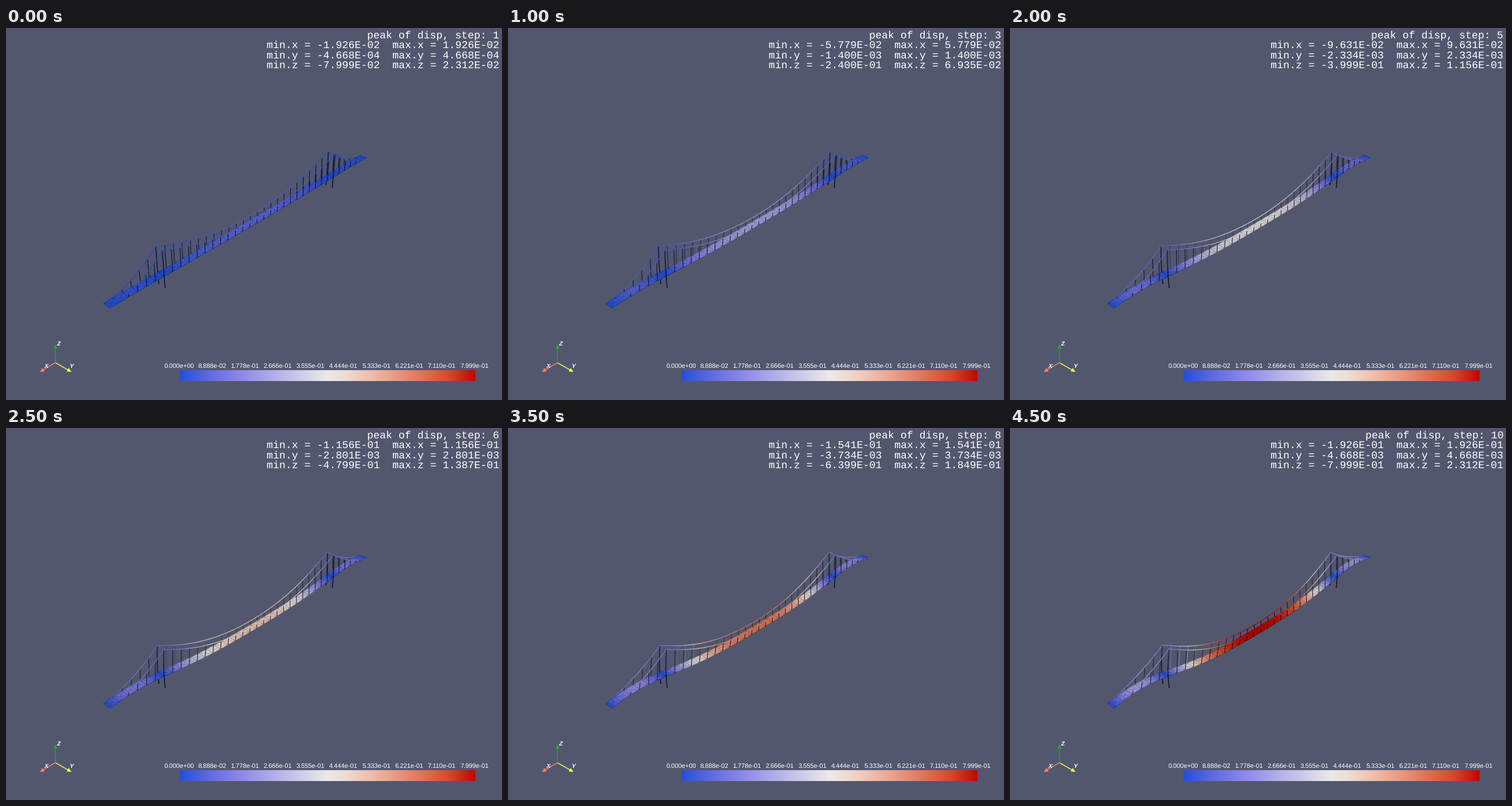
A matplotlib script for the animation above (5 s loop, 864 px wide and 648 px high).

```python
import numpy as np
import matplotlib.pyplot as plt
from matplotlib.animation import FuncAnimation
from matplotlib.collections import LineCollection, PolyCollection
from matplotlib.colors import LinearSegmentedColormap

plt.rcParams["text.hinting"] = "none"

W, H, DPI = 864, 648, 100
PX = 72 / DPI
STEPS = 10
PANELS, SIDE = 36, 6
SAG, SWAY = 0.435, 0.0095     # deck drop and tower lean at the last step
LOW = 0.17                    # cable height at mid-span, in tower heights
PEAK = dict(x=(0.019262, 0.019262), y=(0.0004668, 0.0004668),
            z=(0.079989, 0.023116))

cmap = LinearSegmentedColormap.from_list("disp", [
    (0.0, "#2350da"), (0.1, "#5f6be0"), (0.22, "#938cea"), (0.33, "#b6b2e8"),
    (0.45, "#dcdae8"), (0.5, "#ebe8e8"), (0.56, "#efdcd4"), (0.66, "#edb8a5"),
    (0.75, "#e6927c"), (0.85, "#dc6748"), (0.92, "#d2442b"), (1.0, "#c30404")])

fig = plt.figure(figsize=(W / DPI, H / DPI), dpi=DPI, facecolor="#52576e")
ax = fig.add_axes([0, 0, 1, 1])
ax.axis("off")


def project(u, v, z):
    """Bridge axes (along, across, up) to stage pixels."""
    w = 1 + 0.34 * u + 0.0083 * v - 0.0284 * z
    x = (181 + 660.5 * u - 9.6 * v - 11.7 * z) / w
    y = (488 - 185.2 * u - 4.0 * v - 58.4 * z) / w
    return np.stack([x, y], axis=-1)


def cable_height(i):
    main = LOW + (1 - LOW) * ((i - 18) / 12) ** 2
    end = np.minimum(i, PANELS - i) / SIDE
    return np.where(np.abs(i - 18) <= 12, main, end ** 2)


def lift(i):
    """Vertical mode shape along the deck, at full size."""
    a = np.pi * (i - SIDE) / 24
    main = -SAG * (np.sin(a) + 0.08 * np.sin(3 * a)) / 0.92
    end = np.minimum(i, PANELS - i) / SIDE
    return np.where(np.abs(i - 18) <= 12, main, 0.289 * SAG * np.sin(np.pi * end))


def lean(i):
    """Lengthwise mode shape along the cable, at full size."""
    return SWAY * np.interp(i, [0, 6, 18, 30, 36], [0, 1, 0, -1, 0])


def shade(mag, k, alpha=1.0):
    rgba = cmap(np.clip(mag, 0, 1))
    rgba[..., :3] *= np.asarray(k)[..., None] if np.ndim(k) else k
    rgba[..., 3] = alpha
    return rgba


def size(dz, du):
    return np.hypot(dz / SAG, 0.2408 * du / SWAY)


def pairs(a, b):
    return np.stack([a, b], axis=1)


def chain(pts):
    return pairs(pts[:-1], pts[1:])


def lines(width, z):
    c = LineCollection([], linewidths=width * PX, zorder=z, capstyle="butt")
    ax.add_collection(c)
    return c


deck = PolyCollection([], linewidths=0.3, zorder=3)
ax.add_collection(deck)
mesh = lines(0.8, 4)
edge = lines(1.0, 4)
sides = {v: dict(hang=lines(1.2, z), leg=lines(1.7, z), cable=lines(1.3, z + 0.5))
         for v, z in ((1, 1), (0, 5))}

fine = np.linspace(0, PANELS, PANELS * 3 + 1)
nodes = np.arange(PANELS + 1.0)
hangers = np.array([i for i in range(1, PANELS) if i not in (6, 30)], float)
leg_z = np.linspace(-0.475, 1, 14)


def draw_deck(s):
    near, far = (project(fine / PANELS, v, s * lift(fine)) for v in (0, 1))
    mid = (fine[:-1] + fine[1:]) / 2
    mag = s * size(lift(mid), 0)
    col = shade(mag, 0.9)
    deck.set_verts(np.stack([near[:-1], near[1:], far[1:], far[:-1]], axis=1))
    deck.set_facecolor(col)
    deck.set_edgecolor(col)
    edge.set_segments(np.concatenate([chain(near), chain(far)]))
    edge.set_color(np.concatenate([shade(mag, 0.35, 0.6), shade(mag, 0.6, 0.6)]))

    a, b = near[::3], far[::3]
    mesh.set_segments(np.concatenate(
        [pairs(a, b), pairs(a[:-1], b[1:]), pairs(b[:-1], a[1:])]))
    mag = s * size(lift(nodes), 0)
    mesh.set_color(np.concatenate([shade(mag, 0.3, 0.45)]
                                  + [shade(mag[:-1], 0.35, 0.3)] * 2))


def draw_side(v, s):
    part = sides[v]
    pts = project(fine / PANELS + s * lean(fine), v,
                  cable_height(fine) + s * lift(fine))
    mag = s * size(lift(fine), lean(fine))
    part["cable"].set_segments(chain(pts))
    part["cable"].set_color(shade(mag[:-1], 0.86))

    i = hangers
    top = project(i / PANELS + s * lean(i), v, cable_height(i) + s * lift(i))
    foot = project(i / PANELS, v, s * lift(i))
    lit = 0.5 * v * s * np.clip(lean(i) / SWAY, 0, 1) * (i > SIDE)
    part["hang"].set_segments(pairs(top, foot))
    part["hang"].set_color(shade(s * size(lift(i), lean(i)), 0.22 + lit))

    segs, cols = [], []
    for i, sign in ((6, 1), (30, -1)):
        bend = SWAY * s * np.clip(leg_z, 0, 1) ** 1.5
        segs.append(chain(project(i / PANELS + sign * bend, v, leg_z)))
        cols.append(shade(size(0, bend[1:]), 0.26))
    part["leg"].set_segments(np.concatenate(segs))
    part["leg"].set_color(np.concatenate(cols))


def label(x, y, text, px, font, **kw):
    return ax.text(x, y, text, fontsize=px * PX, fontname=font, color="white", **kw)


# colour bar
ax.imshow(np.linspace(0, 1, 256)[None], cmap=cmap, extent=(302, 817.5, 615, 596),
          aspect="auto", interpolation="nearest")
for k in range(10):
    label(301.7 + 57.2 * k, 592.3, f"{0.79989 * k / 9:.3e}", 11,
          "Liberation Sans", ha="center", va="baseline")

# axis triad
O = np.array([86, 583])
for name, tip, color, at in (("X", (59, 599), "#ff8566", (70, 589)),
                             ("Y", (114, 599), "#fbf54a", (114, 589)),
                             ("Z", (86, 551), "#22a82e", (91, 550))):
    tip = np.array(tip)
    d = (tip - O) / np.hypot(*(tip - O))
    n = np.array([-d[1], d[0]])
    base = tip - 7.5 * d
    ax.plot(*np.stack([O, base]).T, color=color, lw=1.5 * PX, zorder=2)
    ax.fill(*np.stack([tip, base + 3.6 * n, base - 3.6 * n]).T, color=color,
            lw=0, zorder=3)
    label(*at, name, 10.5, "Liberation Sans", ha="center", va="center",
          weight="bold", style="italic", zorder=4)

rows = [label(859.5, 17.2 + 17.6 * k, "", 18.25, "Liberation Mono",
              ha="right", va="baseline") for k in range(4)]

ax.set_xlim(0, W)
ax.set_ylim(H, 0)


def update(frame):
    step = frame + 1
    s = step / STEPS
    draw_deck(s)
    for v in sides:
        draw_side(v, s)
    rows[0].set_text(f"peak of disp, step: {step}")
    for row, (name, (low, high)) in zip(rows[1:], PEAK.items()):
        row.set_text(f"min.{name} = {-low * step:.3E}  max.{name} = {high * step:.3E}")
    return []


anim = FuncAnimation(fig, update, frames=STEPS, interval=500, repeat=True,
                     repeat_delay=0, init_func=lambda: update(0), blit=False)
plt.show()
```
